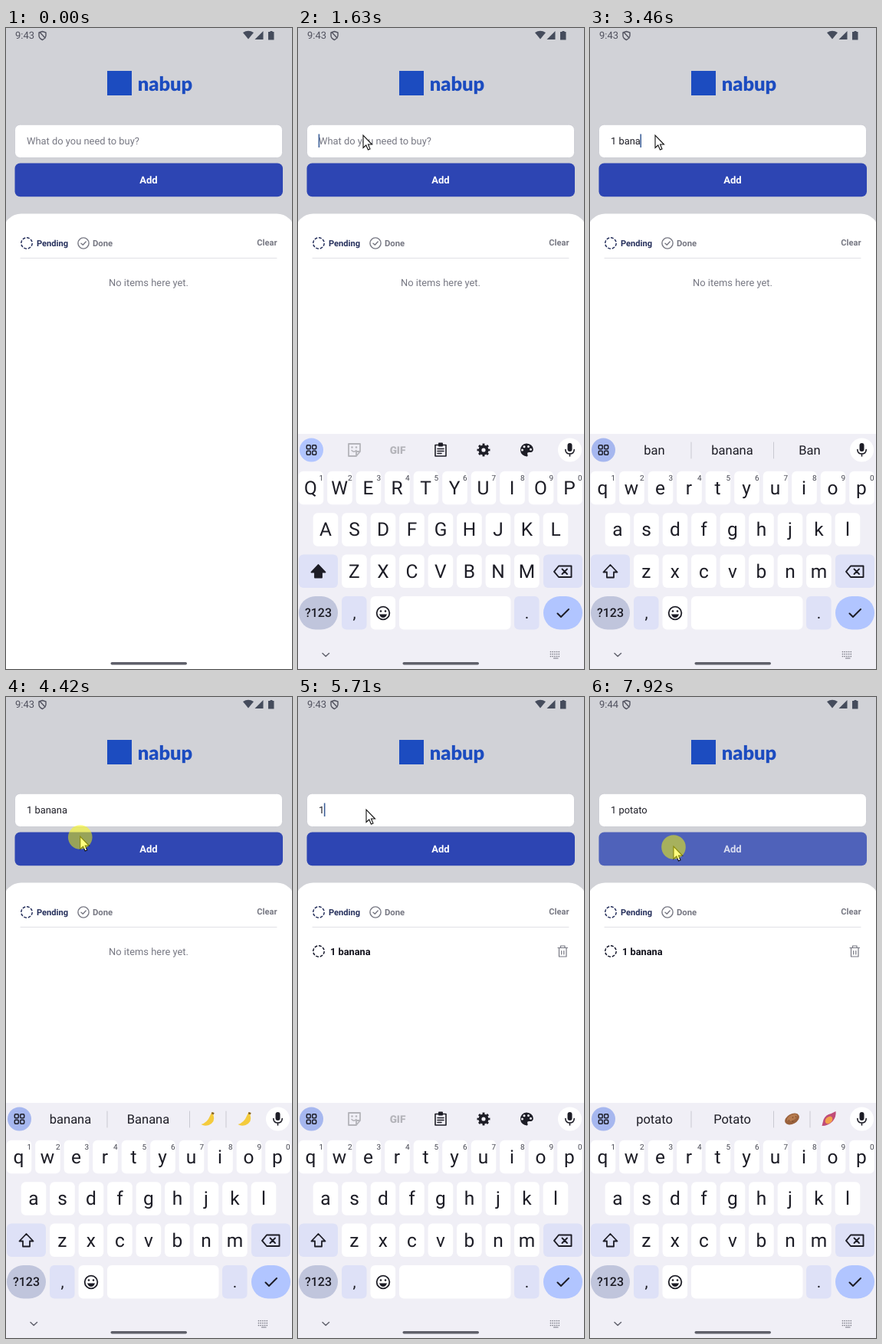
Write an HTML page that moves like this. It is 373x837 px and loops after 7990 ms.

```html
<!DOCTYPE html>
<html lang="en">
<head>
<meta charset="utf-8">
<title>Shopping list</title>
<style>
html, body { margin: 0; width: 100%; height: 100%; overflow: hidden; background: #d1d2d7; }
svg { display: block; width: 373px; height: 837px; font-family: Roboto, Arial, sans-serif; }
text { white-space: pre; text-rendering: geometricPrecision; }
.line { fill: none; stroke-linecap: round; stroke-linejoin: round; }
</style>
</head>
<body>
<svg id="stage" viewBox="0 0 373 837"></svg>
<script>
const INK = '#1d1d26', GREY = '#777883', NAVY = '#26305c', KEYS = '#f0eff6', TINT = '#dee1f7';

// Markup helpers
const text = (x, y, str, size, fill, more = '') =>
  `<text x="${x}" y="${y}" font-size="${size}" fill="${fill}" ${more}>${str}</text>`;
const mid = (x, y, str, size, fill, more = '') => text(x, y, str, size, fill, 'text-anchor="middle" ' + more);
const box = (x, y, w, h, r, fill, more = '') =>
  `<rect x="${x}" y="${y}" width="${w}" height="${h}" rx="${r}" fill="${fill}" ${more}/>`;
const dot = (x, y, r, fill, more = '') => `<circle cx="${x}" cy="${y}" r="${r}" fill="${fill}" ${more}/>`;
const shape = (d, fill, more = '') => `<path d="${d}" fill="${fill}" ${more}/>`;
const line = (d, color, width = 1.5, more = '') =>
  `<path class="line" d="${d}" stroke="${color}" stroke-width="${width}" ${more}/>`;
const group = (id, body, more = '') => `<g id="${id}" ${more}>${body}</g>`;
const dashed = (x, y, color) =>
  dot(x, y, 7.2, 'none', `stroke="${color}" stroke-width="1.5" pathLength="8" stroke-dasharray=".68 .32"`);

function statusBar() {
  return text(12, 14, '9:43', 13, '#51525f', 'id="clock"') +
    line('M47.5 4.5L52 6V10Q51.500 13.500 47.500 15.500Q43 13.500 43 10V6ZM44 5.500L51 13', '#51525f', 1.4) +
    shape('M309 6Q316 1.500 323 6L316 14.500Z', '#454c5c') +
    shape('M335.500 4V15H324.500Z', '#454c5c') +
    shape('M344.500 4H347.500V5H349.500V15.500H342V5H344.500Z', '#454c5c');
}

function header() {
  return box(132, 56, 32, 32, 0, '#1c4cc0') +
    mid(207.500, 82, 'nabup', 25.5, '#1c4cc0', 'font-family="Lato, sans-serif" font-weight="900"') +
    box(11.500, 126.200, 349, 43.300, 7, '#fff', 'stroke="#c6c7ce" stroke-width=".8"') +
    text(27, 152.300, '', 12.9, INK, 'id="field"') +
    box(26.600, 138.500, 1.600, 17.500, 0, '#3f6199', 'id="caret"') +
    box(11.500, 176.500, 349.500, 43.700, 7, '#2d45b3', 'id="button"') +
    mid(186, 203, 'Add', 13, '#fff', 'id="label" font-weight="600"');
}

function sheet() {
  const bin = 'M339 327.500H351.500M342.500 327.500V325H348V327.500M340.500 328V339H350V328M343.700 331.500V336M346.800 331.500V336';
  return box(-4, 242.500, 381, 640, 24, '#fff') +
    dashed(27, 281, NAVY) + text(40, 285, 'Pending', 11.1, NAVY, 'font-weight="700"') +
    dot(101, 281, 7.1, 'none', `stroke="${GREY}" stroke-width="1.4"`) + line('M98 281.200L100.300 283.300L104.200 279', GREY, 1.4) +
    text(113, 285, 'Done', 11.3, GREY, 'font-weight="600"') +
    text(353.500, 284.300, 'Clear', 11.1, GREY, 'text-anchor="end" font-weight="600"') +
    line('M19 300.500H353', '#e1e1e6', 1) +
    group('empty', mid(186, 336.800, 'No items here yet.', 12.9, GREY)) +
    group('item', dashed(27, 332, '#14162a') +
      text(42, 336.800, '1 banana', 12.8, '#14141e', 'font-weight="600"') + line(bin, GREY, 1.2));
}

function toolbar() {
  const pale = '#b4b4ba';
  return line('M66 543H81V553L76 559H66ZM81 553H76V559', pale, 1.8) +
    line('M70 551.500Q73 555 76 551.500', pale) + dot(70.500, 547.500, 1.2, pale) + dot(76, 547.500, 1.2, pale) +
    mid(130, 555.800, 'GIF', 13.5, pale, 'font-weight="900"') +
    line('M179 544.500H193V559H179ZM182 549.500H190M182 552.500H190M182 555.500H187', INK, 1.6) + box(183, 541.500, 6, 5, 1, INK) +
    dot(242, 551, 4.6, 'none', `stroke="${INK}" stroke-width="4"`) +
    dot(242, 551, 7.2, 'none', `stroke="${INK}" stroke-width="2.6" pathLength="8" stroke-dasharray=".5 .5" stroke-dashoffset=".25"`) +
    shape('M298 542.500A8.500 8.500 0 1 0 299 559.500Q300.500 558 299 556Q299 554 301 554H304Q307 553 306.800 550Q306 543 298 542.500Z', INK) +
    [[292.5, 551], [295, 546.800], [300.5, 546.500], [303.5, 550.300]].map(p => dot(...p, 1.5, KEYS)).join('');
}

function suggestions() {
  const potato = dot(0, 0, 1, 'none') +
    '<ellipse rx="10" ry="6.500" fill="#99613c" transform="rotate(-28)"/>' +
    '<ellipse cx="1" cy="-1.500" rx="7.500" ry="3.600" fill="#b67b4e" transform="rotate(-28)"/>' +
    [[-4, 2], [1, -2], [5, -3], [1, 3]].map(p => dot(...p, .8, '#704324')).join('');
  const sweet = shape('M9 -10Q10 -3 5 3Q-1 9 -9 9Q-8 5 -7 1Q-4 -6 3 -7Z', '#c04c78') +
    '<ellipse cx="-1" cy="1" rx="5.500" ry="4" fill="#f2a24c" transform="rotate(-45)"/>';
  const banana = shape('M5 -9L8 -8L7 -5Q10 4 1 8Q-5 10 -9 7Q-1 5 3 -5Z', '#f4cb3d') + shape('M5 -9L8 -8L7.500 -6L4.500 -6.500Z', '#80602c');
  const pair = (id, a, b) => group(id, `<g transform="translate(263.500 551)">${a}</g><g transform="translate(311.500 551)">${b}</g>` +
    line('M287 541V562', '#c9c9d1', 1));
  return line('M132 541V562M239.500 541V562', '#c9c9d1', 1) +
    [84, 185.5, 286.5].map((x, i) => mid(x, 557, '', 16.5, INK, `id="hint${i}"`)).join('') +
    pair('banana', banana, banana) + pair('potato', potato, sweet);
}

function keyboard() {
  let out = box(0, 530, 373, 307, 0, KEYS) +
    dot(17.500, 551, 15.5, '#b1c5ff', 'id="grid"') +
    [[11.3, 544.800], [18.7, 544.800], [11.3, 552.200], [18.7, 552.200]]
      .map(p => box(...p, 5, 5, 1.2, 'none', `stroke="${INK}" stroke-width="1.5"`)).join('') +
    dot(354.500, 551, 15.5, '#fff') + box(351.500, 542, 6, 11, 3, INK) +
    line('M348.800 550.500Q349 556 354.500 556Q360 556 360.200 550.500M354.500 556V559', INK, 1.6) +
    group('tools', toolbar()) + group('hints', suggestions());
  ['QWERTYUIOP', 'ASDFGHJKL', 'ZXCVBNM'].forEach((row, r) => {
    const top = 578.800 + 54.4 * r;
    [...row].forEach((letter, i) => {
      const x = [17, 36, 73.4][r] + 37.5 * i;
      out += box(x - 16.3, top, 32.6, 43.5, 6, '#fff') +
        mid(x - (r ? 0 : .5), top + 30, letter, 24.5, INK, 'class="key"');
      if (!r) out += mid(x + 13.2, top + 12, (i + 1) % 10, 10, '#444550');
    });
  });
  const arrow = 'M26.500 701L17.500 710.500H22V717.500H31V710.500H35.500Z';
  return out + box(1, 687.600, 51, 43.5, 6, TINT) + box(320, 687.600, 51, 43.5, 6, TINT) +
    shape(arrow, 'none', `id="shift" stroke="${INK}" stroke-width="1.8" stroke-linejoin="round"`) +
    line('M340 702.500H356.500V717H340L334 709.800ZM344.500 706.500L351 713M351 706.500L344.500 713', INK, 1.9) +
    box(1, 742, 51, 43.5, 21.7, '#c0c5dc') + mid(26.500, 769, '?123', 16, INK, 'font-weight="500"') +
    box(57, 742, 32.600, 43.5, 6, TINT) + mid(73.500, 771, ',', 21, INK) +
    box(94.500, 742, 32.600, 43.5, 6, '#fff') + box(132, 742, 145.500, 43.5, 6, '#fff') +
    dot(111, 764, 8.3, 'none', `stroke="${INK}" stroke-width="1.800"`) + dot(108, 761.500, 1.3, INK) + dot(114, 761.500, 1.3, INK) +
    shape('M106 765.500H116Q114.500 770 111 770Q107.500 770 106 765.500Z', INK) +
    box(282, 742, 32.600, 43.5, 6, TINT) + mid(298.500, 771, '.', 21, INK) +
    box(320, 742, 51, 43.5, 21.7, '#b1c5ff') + line('M338.500 764.500L343 769L353 759', INK, 2) +
    line('M32 816.500L36.200 820.500L40.500 816.500', '#62636e', 1.5) +
    [814.5, 817.5, 820.5].map(y => line(`M329.500 ${y}H343`, '#777883', 1.7, 'stroke-dasharray="0 2.700"')).join('') +
    line('M333.500 823H339', '#777883', 1.2);
}

const stage = document.getElementById('stage');
stage.innerHTML = statusBar() + header() + sheet() + group('keyboard', keyboard()) +
  box(136.500, 828, 99.500, 3.500, 1.7, '#5f606a') +
  group('cursor', shape('M0 0V16.500L3.800 13L6.400 19L9 17.900L6.500 12H11.500Z', '#fff', 'stroke="#111" stroke-width="1.100"') +
    dot(0, 1, 15.8, '#ff0', 'id="tap" opacity=".5"'));

const $ = id => document.getElementById(id);
const show = (id, on) => $(id).style.display = on ? '' : 'none';
const within = (t, spans) => spans.some(([a, b]) => t >= a && t < b);
const latest = (t, list) => list.reduce((found, e) => e[0] <= t ? e : found, [0, '']);
const clamp = v => Math.max(0, Math.min(1, v));

const LOOP = 7990, TICK = 68;
const typed = [
  [2770, '1'], [2980, '1 '], [3180, '1 b'], [3320, '1 ba'], [3390, '1 ban'], [3460, '1 bana'],
  [3530, '1 banan'], [3600, '1 banana'], [4620, ''], [5710, '1'], [6110, '1 '], [6310, '1 p'],
  [6590, '1 po'], [6650, '1 pot'], [6720, '1 pota'], [6790, '1 potat'], [6860, '1 potato']
];
const hints = [
  [3250, 'b', 'be', 'B'], [3390, 'ba', 'banana', 'Ba'], [3460, 'ban', 'banana', 'Ban'],
  [3530, 'bana', 'banana', 'Bana'], [3670, 'banan', 'banana', 'Banan'], [3870, 'banana', 'Banana', ''],
  [4620, ''], [6380, 'p', 'P', 'pm'], [6590, 'po', 'Potato', 'PO'], [6720, 'pot', 'Potato', 'Pot'],
  [6860, 'potat', 'potato', 'Potat'], [6920, 'potato', 'Potato', '']
];
const carets = [[1220, 1710], [2240, 2700], [2770, 4140], [4620, 5230], [5710, 7420]];
const taps = [[1090, 1220], [4410, 4620], [7780, LOOP]];
const path = [
  [120, 332, 806], [260, 331, 700], [400, 330, 581], [520, 305, 445], [630, 230, 240], [720, 140, 110],
  [790, 103, 93], [880, 88, 125], [950, 86, 137], [1010, 85, 140], [4110, 85, 140], [4340, 94, 172],
  [4410, 97, 183], [4620, 97, 183], [4740, 96, 173], [4890, 91, 167], [5040, 89, 149], [5100, 89, 147],
  [7160, 89, 147], [7420, 106, 183], [7600, 109, 195], [LOOP, 109, 195]
];

function cursorAt(t) {
  const i = path.findIndex(p => p[0] > t);
  const [a, b] = [path[i - 1], path[i]], u = (t - a[0]) / (b[0] - a[0]);
  return [1, 2].map(k => a[k] + (b[k] - a[k]) * u);
}

function draw(t) {
  const step = 120 + Math.floor((t - 120) / TICK) * TICK;
  const value = latest(t, typed)[1], hint = latest(t, hints);

  $('clock').textContent = t < 7260 ? '9:43' : '9:44';
  $('field').textContent = value || 'What do you need to buy?';
  $('field').setAttribute('fill', value ? INK : GREY);
  $('caret').setAttribute('x', 26.6 + (value ? $('field').getComputedTextLength() : 0));
  show('caret', within(t, carets));

  const press = Math.max(clamp((t - 4410) / 130) * clamp((4850 - t) / 240), clamp((t - 7780) / 130));
  $('button').setAttribute('opacity', 1 - .21 * press);
  $('label').setAttribute('opacity', 1 - .21 * press);
  show('empty', t < 4620);
  show('item', t >= 4620);

  show('keyboard', t >= 1420);
  $('keyboard').setAttribute('transform', `translate(0 ${307 * (1 - clamp((step - 1350) / 240)) ** 2})`);
  document.querySelectorAll('.key').forEach(k =>
    k.textContent = value ? k.textContent.toLowerCase() : k.textContent.toUpperCase());
  $('shift').setAttribute('fill', value ? 'none' : INK);
  $('grid').setAttribute('fill', t < 2770 ? '#b1c5ff' : '#a6b7ef');
  show('tools', !hint[1]);
  show('hints', hint[1]);
  for (let i = 0; i < 3; i++) $('hint' + i).textContent = hint[i + 1] || '';
  show('banana', hint[1] === 'banana');
  show('potato', hint[1] === 'potato');

  show('cursor', t >= 120);
  if (t >= 120) $('cursor').setAttribute('transform', `translate(${cursorAt(step)})`);
  show('tap', within(t, taps));
}

const start = performance.now();
function loop() {
  draw((performance.now() - start) % LOOP);
  requestAnimationFrame(loop);
}
loop();
</script>
</body>
</html>
```
